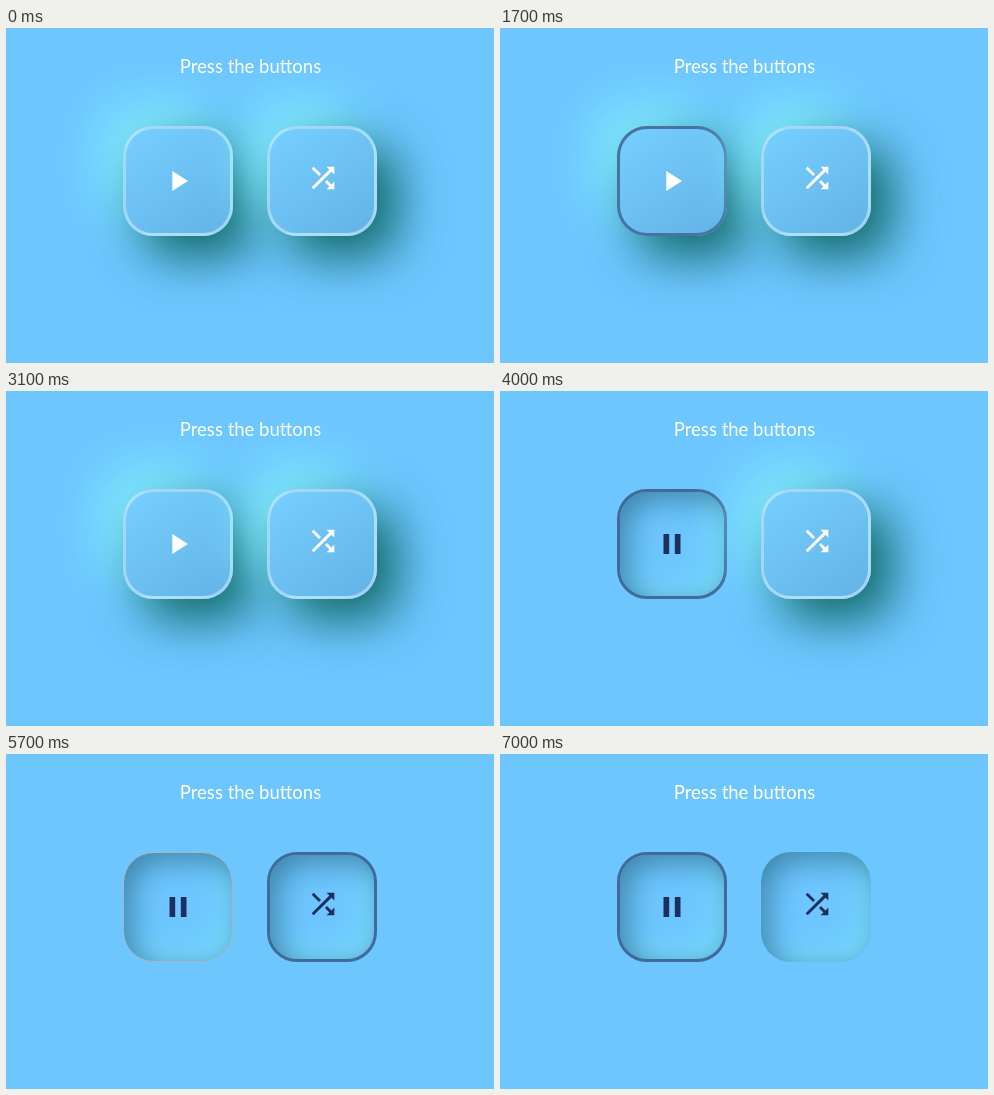
An HTML page that plays this animation: 488 by 335 pixels, repeating every 8000 ms.

```html
<!DOCTYPE html>
<html lang="en">
<head>
<meta charset="utf-8">
<title>Press the buttons</title>
<style>
  :root {
    --bg: #6ec6ff;
    --light: rgba(255, 255, 255, .4);
    --dark: #3f6a9a;
    --bare: #f8e8d8;
    --ink: #1d2f5e;
    --face: linear-gradient(145deg, #76d0ff, #63b2e6);
    --flat: linear-gradient(var(--bg), var(--bg));
    --raised:
      20px 20px 50px #0e6664, -20px -20px 50px #84f0ff,
      inset 8px 8px 30px #3d83ab00, inset -8px -8px 30px #7ee4ff00;
    --sunken:
      20px 20px 50px #0e666400, -20px -20px 50px #84f0ff00,
      inset 8px 8px 30px #3d83ab, inset -8px -8px 30px #7ee4ff;
  }
  html, body {
    margin: 0;
    width: 100%;
    height: 100%;
    overflow: hidden;
    background: var(--bg);
  }
  h1 {
    position: absolute;
    top: 26px;
    left: 0;
    width: 489px;
    margin: 0;
    font: 400 18.5px/25px Lato, sans-serif;
    text-align: center;
    color: #fff;
  }
  .btn {
    position: absolute;
    top: 98px;
    box-sizing: border-box;
    width: 110px;
    height: 110px;
    border: 3px solid var(--light);
    border-radius: 30px;
  }
  .play { left: 117px; animation: press-play 8s infinite, edge-play 8s infinite; }
  .mix { left: 261px; animation: press-mix 8s infinite, edge-mix 8s infinite; }

  svg {
    position: absolute;
    width: 34px;
    height: 34px;
    fill: #fff;
  }
  .i-play, .i-pause { left: 155px; top: 136px; }
  .i-mix { left: 300px; top: 133px; animation: ink 8s infinite; }
  .i-play { animation: hide 8s step-end infinite; }
  .i-pause { fill: var(--ink); animation: show 8s step-end infinite; }

  @keyframes press-play {
    0%, 45% { box-shadow: var(--raised); background-image: var(--face); }
    50%, 100% { box-shadow: var(--sunken); background-image: var(--flat); }
  }
  @keyframes press-mix {
    0%, 62.5% { box-shadow: var(--raised); background-image: var(--face); }
    67.5%, 100% { box-shadow: var(--sunken); background-image: var(--flat); }
  }
  @keyframes edge-play {
    0%, 9.4% { border: 3px solid var(--light); }
    13.75%, 20.8% { border: 3px solid var(--dark); }
    25.8%, 44.5% { border: 3px solid var(--light); }
    49%, 56.8% { border: 3px solid var(--dark); }
    59.8%, 70% { border: 0 solid var(--bare); }
    75%, 100% { border: 3px solid var(--dark); }
  }
  @keyframes edge-mix {
    0%, 21.25% { border: 3px solid var(--light); }
    26.25%, 34.5% { border: 3px solid var(--dark); }
    38.75%, 57.5% { border: 3px solid var(--light); }
    62.5%, 72.5% { border: 3px solid var(--dark); }
    77.5%, 100% { border: 0 solid var(--bare); }
  }
  @keyframes hide { 0% { opacity: 1; } 46.25%, 100% { opacity: 0; } }
  @keyframes show { 0% { opacity: 0; } 46.25%, 100% { opacity: 1; } }
  @keyframes ink { 0%, 62.5% { fill: #fff; } 67.5%, 100% { fill: var(--ink); } }
</style>
</head>
<body>
  <h1>Press the buttons</h1>
  <div class="btn play"></div>
  <div class="btn mix"></div>
  <svg class="i-play" viewBox="0 0 24 24"><path d="M8 5v14l11-7z"/></svg>
  <svg class="i-pause" viewBox="0 0 24 24"><path d="M6 5h4v14H6zM14 5h4v14h-4z"/></svg>
  <svg class="i-mix" viewBox="0 0 24 24">
    <path d="M10.6 9.2 5.4 4 4 5.4l5.2 5.2zM14.5 4l2 2L4 18.6 5.4 20 18 7.5l2 2V4zM14.8 13.4l-1.4 1.4 3.1 3.2-2 2H20v-5.5l-2 2z"/>
  </svg>
</body>
</html>
```
